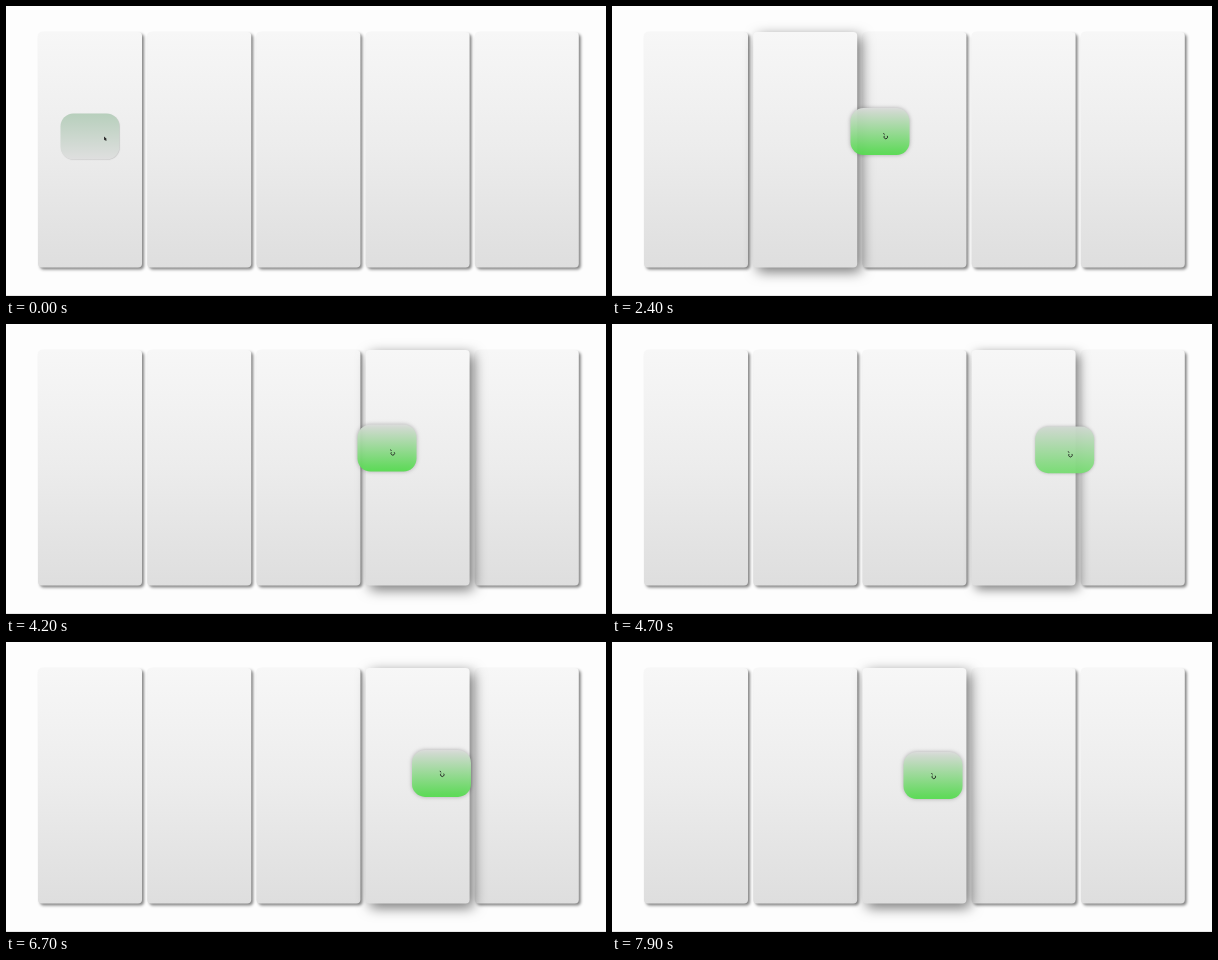
Recreate the animation shown at these times as an HTML page with a canvas. Size 600 px wide and 290 px high, loop 8 s.

```html
<!DOCTYPE html>
<html lang="en">
<head>
<meta charset="utf-8">
<title>Drag between panels</title>
<style>
  html, body { margin: 0; width: 100%; height: 100%; overflow: hidden; background: #fdfdfd; }
  canvas { display: block; }
</style>
</head>
<body>
<canvas id="stage" width="600" height="290"></canvas>
<script>
const ctx = document.getElementById('stage').getContext('2d');
const LOOP = 8000, STEP = 100;
const GRAB = 400, DROP = 4700, REGRAB = 6200;
const PITCH = 109.2, PANELS = [0, 1, 2, 3, 4];

// Time and x of the tile's centre where its speed changes
const stops = [
  [500, 84], [1400, 138], [2400, 268], [2800, 307], [2900, 307], [3500, 414], [3700, 414],
  [4200, 381], [4800, 467], [5000, 520.5], [REGRAB, 520.5], [6700, 435.5], [7900, 321]
];

const clamp = v => Math.min(1, Math.max(0, v));
const mix = (a, b, k) => a + (b - a) * k;
const blend = (a, b, k) => `rgb(${a.map((v, i) => mix(v, b[i], k)).join()})`;

function tileX(t) {
  const next = Math.max(1, stops.findIndex(([time]) => time >= t));
  const [[t0, x0], [t1, x1]] = stops.slice(next - 1, next + 1);
  return mix(x0, x1, clamp((t - t0) / (t1 - t0)));
}

const grabbed = t => t >= GRAB && t < DROP || t >= REGRAB - 50;
// The left part of the tile decides which panel is raised
const panelUnder = t => Math.floor((tileX(t) - 50) / PITCH);
// Share of the last 200 ms during which a state held, giving linear fades
const fade = (t, state) => [0, 50, 100, 150].filter(ago => state(t - ago)).length / 4;

function tileAt(t, held) {
  const drift = t < REGRAB
    ? -6.5 * held * Math.sin(Math.PI * clamp((t - GRAB) / 7400))
    : 3 * clamp((t - REGRAB) / 1700);
  return [tileX(t), 130.5 + drift];
}

function pointerAt(t, [x, y]) {
  if (t >= REGRAB) return [x, y];
  if (t >= 4800) {
    const glide = 1 - (1 - clamp((t - 5500) / 300)) ** 3;
    return [mix(472, 519, glide), 132];
  }
  const settle = clamp((t - GRAB) / 600);
  return [x + mix(15, 5, settle), y + mix(1.5, 4, settle)];
}

function box(x, y, w, h, r, colors, [offset, blur, shade]) {
  const fill = ctx.createLinearGradient(0, y, 0, y + h);
  colors.forEach((c, i) => fill.addColorStop(i / (colors.length - 1), c));
  ctx.save();
  ctx.fillStyle = fill;
  ctx.shadowOffsetX = ctx.shadowOffsetY = offset;
  ctx.shadowBlur = blur;
  ctx.shadowColor = `rgba(0,0,0,${shade})`;
  ctx.beginPath();
  ctx.roundRect(x, y, w, h, r);
  ctx.fill();
  ctx.restore();
}

function drawPanel(i, lift) {
  box(32 + PITCH * i, 26, 104, 235.5, 4, ['#f7f7f7', '#ececec', '#dedede'],
    [mix(2, 4, lift), mix(3, 13, lift), mix(0.48, 0.55, lift)]);
}

function drawTile([x, y], held) {
  const w = 59, h = mix(46, 47, held);
  ctx.globalAlpha = mix(1, 0.93, held);
  box(x - w / 2, y - h / 2, w, h, 13,
    [blend([183, 207, 188], [219, 221, 219], held),
     blend([223, 223, 223], [84, 221, 78], held)],
    [mix(0.5, 0, held), mix(1, 4, held), mix(0.15, 0.3, held)]);
  ctx.globalAlpha = 1;
}

function drawPointer([x, y], holding) {
  ctx.save();
  ctx.translate(x, y);
  ctx.fillStyle = ctx.strokeStyle = '#222';
  ctx.lineWidth = 0.9;
  if (holding) {
    ctx.stroke(new Path2D('M-1.5-2.5L-.6-1M-.6.2A1.8 1.8 0 1 0 2.2.2'));
  } else {
    ctx.fill(new Path2D('M-1-1.5L2 1.2.9 1.4 1.6 2.8.8 3 .2 1.7-.8 2.3Z'));
  }
  ctx.restore();
}

function draw(t) {
  ctx.fillStyle = '#fdfdfd';
  ctx.fillRect(0, 0, 600, 290);
  ctx.fillStyle = '#e6e6e6';
  ctx.fillRect(0, 289, 600, 1);

  // Raised panels come last to cast their shadow over the neighbours
  const lifts = PANELS.map(i => fade(t, time => grabbed(time) && panelUnder(time) === i));
  [...PANELS].sort((a, b) => lifts[a] - lifts[b]).forEach(i => drawPanel(i, lifts[i]));

  const held = fade(t, grabbed);
  const tile = tileAt(t, held);
  drawTile(tile, held);
  drawPointer(pointerAt(t, tile), held > 0.4);
}

const start = performance.now();
function tick() {
  const t = (performance.now() - start) % LOOP;
  draw(Math.floor(t / STEP) * STEP);
  requestAnimationFrame(tick);
}
tick();
</script>
</body>
</html>
```
